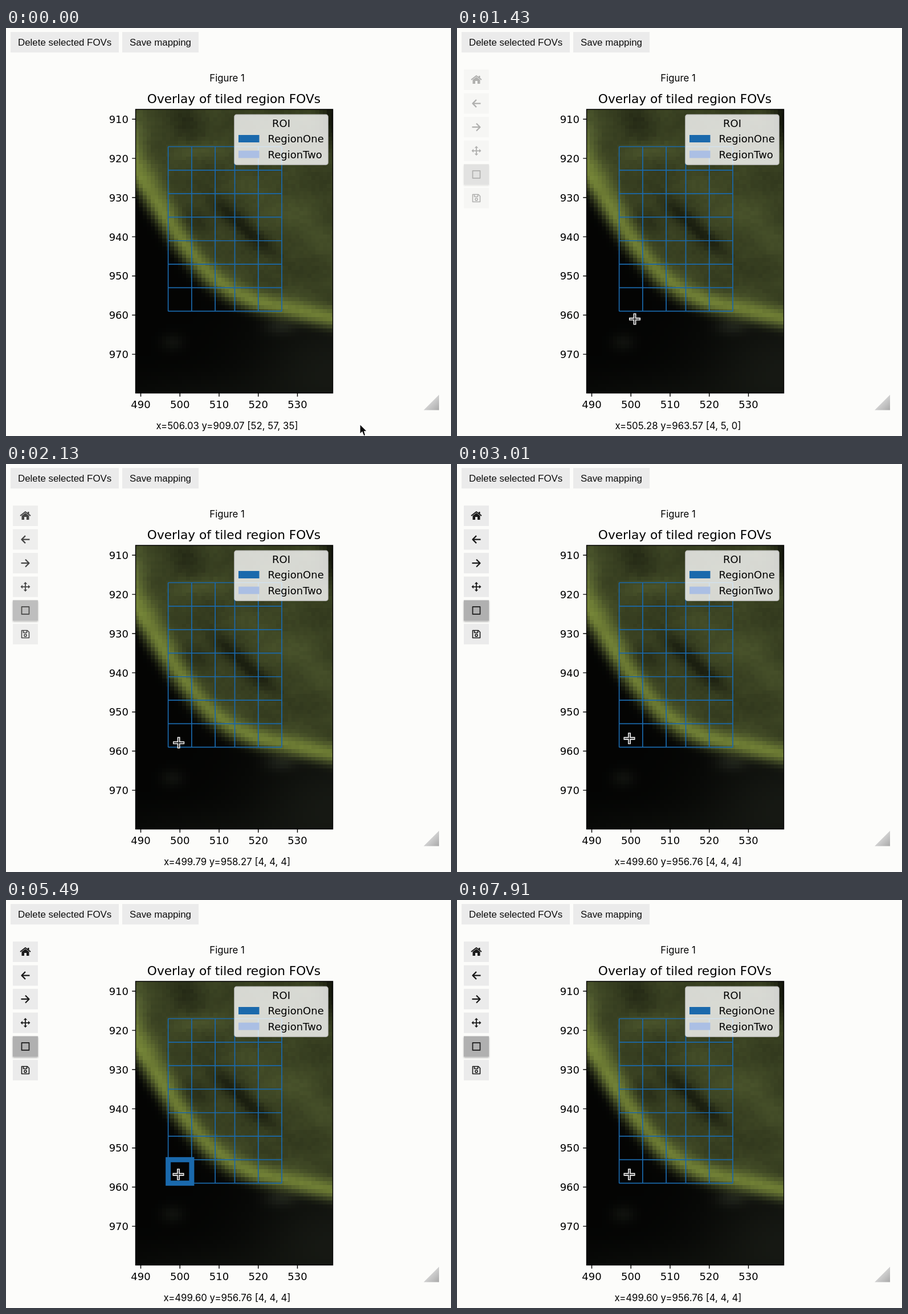
An HTML page with a canvas that plays this animation: 781x717 px, repeating every 8000 ms.

```html
<!DOCTYPE html>
<html lang="en">
<head>
<meta charset="utf-8">
<title>Tiled region overlay</title>
<style>
  html, body { margin: 0; width: 100%; height: 100%; overflow: hidden; background: #fcfcfa; }
  canvas, svg { position: absolute; left: 0; top: 0; display: block; }
  .plot { font: 18px "DejaVu Sans", sans-serif; }
  .title { font-size: 21.7px; }
  .button { font: 16.9px "Liberation Sans", Arial, sans-serif; }
  .ui { font: 16.8px Inter, sans-serif; }
  .mid { text-anchor: middle; }
  .end { text-anchor: end; }
</style>
</head>
<body>
<canvas id="photo" width="781" height="717"></canvas>
<svg id="stage" width="781" height="717" viewBox="0 0 781 717">
  <defs>
    <linearGradient id="grip" x1="0.35" y1="0.35" x2="1" y2="1">
      <stop offset="0" stop-color="#dcdcdc"/><stop offset="1" stop-color="#a9a9a9"/>
    </linearGradient>
    <filter id="shadow" x="-20%" y="-20%" width="140%" height="150%">
      <feDropShadow dx="0" dy="1.5" stdDeviation="1.8" flood-opacity="0.35"/>
    </filter>
  </defs>

  <g class="button" fill="#0c0c0c">
    <rect x="8" y="7" width="190" height="36" fill="#ebebeb"/>
    <text x="21" y="31">Delete selected FOVs</text>
    <rect x="204" y="7" width="134" height="36" fill="#ebebeb"/>
    <text x="217" y="31">Save mapping</text>
  </g>
  <text class="ui mid" x="388" y="94">Figure 1</text>

  <g id="toolbar"></g>

  <g id="axes" class="plot"></g>
  <rect id="picked" fill="none" stroke="#1a69ac" stroke-width="9"/>
  <g class="plot">
    <rect x="401" y="152.5" width="164" height="87.5" rx="3.6" fill="#fff" fill-opacity=".8" stroke="#ccc" stroke-opacity=".8" stroke-width="1.8"/>
    <text class="mid" x="483" y="174">ROI</text>
    <rect x="408" y="188" width="36.5" height="13" fill="#1a69ac"/>
    <rect x="408" y="215.5" width="36.5" height="13" fill="#abbfe4"/>
    <text x="459.5" y="201">RegionOne</text>
    <text x="459.5" y="228.5">RegionTwo</text>
  </g>

  <path d="M733 671.5L760 644.5V671.5Z" fill="url(#grip)"/>
  <text id="readout" class="ui mid" x="388" y="705"></text>

  <g id="tear" fill="none" stroke-width="1.3"></g>
  <path id="arrow" d="M0 0V18L4 14L7 21L10 20L8 13H13Z" fill="#080808" stroke="#fff" stroke-width="1.4"/>
  <g id="cross">
    <path d="M-10 0H10M0-10V10" stroke="#fff" stroke-width="4.8"/>
    <path d="M-8.7 0H8.7M0-8.7V8.7" stroke="#111" stroke-width="1.6"/>
  </g>
</svg>
<script>
const LOOP = 8000, CELL = 6.88, BLUE = "#1a69ac";
const BOX = { x: 227.5, y: 143, w: 346, h: 498.5 };
const PICK = [5200, 7100], TEAR = [6860, 6940];

const $ = id => document.getElementById(id);
const clamp = v => Math.min(1, Math.max(0, v));
const smooth = v => { v = clamp(v); return v * v * (3 - 2 * v); };
const within = (t, [a, b]) => t >= a && t < b;
const show = (id, on) => $(id).setAttribute("visibility", on ? "visible" : "hidden");

// Plot units to stage pixels and back
const toX = u => 236.5 + (u - 490) * 6.875;
const toY = v => 160.3 + (v - 910) * 6.885;
const fromX = x => 490 + (x - 236.5) / 6.875;
const fromY = y => 910 + (y - 160.3) / 6.885;

// Bright rim: a steep and a shallow line joined by a soft minimum
function rimY(x) {
  const steep = 259 + 1.6 * (x - 232), flat = 511 - .19 * (580 - x), k = 45;
  return -k * Math.log(Math.exp(-steep / k) + Math.exp(-flat / k));
}

function paintPhoto() {
  const g = $("photo").getContext("2d");
  let seed = 7;
  const rand = () => (seed = seed * 16807 % 2147483647) / 2147483647;
  g.beginPath();
  g.rect(BOX.x, BOX.y, BOX.w, BOX.h);
  g.clip();
  for (let row = 0; row < 73; row++) for (let col = 0; col < 52; col++) {
    const left = 226.2 + col * CELL, top = BOX.y + row * CELL;
    const x = left + CELL / 2, y = top + CELL / 2;
    const spot = (cx, cy, rx, ry, a = 0) => {
      const c = Math.cos(a), s = Math.sin(a), dx = x - cx, dy = y - cy;
      return Math.exp(-(((dx * c + dy * s) / rx) ** 2) - ((dy * c - dx * s) / ry) ** 2);
    };
    const slope = (rimY(x + 4) - rimY(x - 4)) / 8;
    const d = (y - rimY(x)) / Math.hypot(1, slope);
    const inside = 1 - smooth((d + 4) / 38);
    const spread = d > 0 ? 18 : 19 + 12 * smooth((330 - x) / 70);
    const rim = 62 * Math.exp(-((d / spread) ** 2));
    const grain = 5 * Math.sin(x / 21 + y / 40) * Math.sin(y / 17 - x / 50) + (rand() - .5) * 5;
    const tissue = (64 + grain
      + 22 * spot(230, 175, 20, 55) + 18 * spot(335, 215, 45, 15)
      + 16 * spot(495, 325, 95, 30, .65) - 34 * spot(420, 352, 84, 15, .72)
      - 14 * spot(338, 342, 38, 25, .75) - 20 * spot(315, 162, 34, 30)
      - 42 * spot(575, 160, 26, 48)) * inside + rim;
    const murk = (4 + 20 * spot(575, 600, 140, 110) + 8 * spot(350, 650, 170, 45)
      + 13 * spot(292, 552, 20, 15) + 20 * spot(482, 525, 28, 14)) * (1 - inside);
    const blue = .52 - .1 * clamp(rim / 60);
    const rgb = [tissue * .88 + murk * .9, tissue + murk, tissue * blue + murk * .78];
    g.fillStyle = `rgb(${rgb.map(v => Math.round(Math.max(0, v)))})`;
    const px = Math.round(left), py = Math.round(top);
    g.fillRect(px, py, Math.round(left + CELL) - px, Math.round(top + CELL) - py);
  }
}

function buildAxes() {
  let grid = "", ticks = "", labels = "";
  for (let i = 0; i < 6; i++) grid += `M${toX(497 + Math.round(5.8 * i))} ${toY(917)}V${toY(959)}`;
  for (let v = 917; v <= 959; v += 6) grid += `M${toX(497)} ${toY(v)}H${toX(526)}`;
  for (let v = 490; v <= 530; v += 10) {
    ticks += `M${toX(v)} 641.5v6.3`;
    labels += `<text class="mid" x="${toX(v)}" y="668">${v}</text>`;
  }
  for (let v = 910; v <= 970; v += 10) {
    ticks += `M227.5 ${toY(v)}h-6.3`;
    labels += `<text class="end" x="215" y="${toY(v) + 6.7}">${v}</text>`;
  }
  $("axes").innerHTML = `<path d="${grid}" fill="none" stroke="${BLUE}" stroke-width="1.7"/>
    <path d="${ticks}M227.5 143h346v498.5h-346Z" fill="none" stroke="#000" stroke-width="1.44"/>
    ${labels}<text class="title mid" x="400" y="132">Overlay of tiled region FOVs</text>`;
  const cell = { x: toX(497), y: toY(953), width: 6 * 6.875, height: 6 * 6.885 };
  for (const key in cell) $("picked").setAttribute(key, cell[key]);
}

function buildToolbar() {
  const line = (d, w = 2) => `<path d="${d}" fill="none" stroke="#1a1a1a" stroke-width="${w}" stroke-linejoin="round"/>`;
  const fill = d => `<path d="${d}" fill="#1a1a1a"/>`;
  const turn = (art, angle) => `<g transform="rotate(${angle})">${art}</g>`;
  const back = line("M7.5 0H-6M0-6.5L-6.5 0L0 6.5", 2.2);
  const spoke = line("M0 0V-6", 1.8) + fill("M0-8.5L3.2-5H-3.2Z");
  const icons = [
    line("M-9 0L0-7L9 0") + fill("M-6.5 0L0-5L6.5 0V7H2V2H-2V7H-6.5ZM4-7H6.5V-2L4-4Z"),
    back,
    turn(back, 180),
    [0, 90, 180, 270].map(a => turn(spoke, a)).join(""),
    line("M-6.5-6.5h13v13h-13Z", 1.7),
    line("M-6.5-6.5h10l3 3v10h-13ZM-3.5-6v3.5h6V-6", 1.6) + '<circle cy="2" r="2.1" fill="none" stroke="#1a1a1a" stroke-width="1.5"/>'
  ];
  $("toolbar").innerHTML = icons.map((icon, i) => {
    const look = i === 4 ? 'fill="#b0b0b0" filter="url(#shadow)"' : 'fill="#ebebeb"';
    return `<g transform="translate(34 ${91 + i * 41.6})"><rect x="-22" y="-18" width="44" height="36" ${look}/>${icon}</g>`;
  }).join("");
}

function buildTear() {
  let d = "";
  for (let y = 477; y < 527; y += 3.1) d += `M303 ${y}l23 .6`;
  $("tear").innerHTML = `<path d="${d}" stroke="#5b9dd0"/>
    <path d="M303.5 476v50M309 478v48" stroke="#f2f8ff" stroke-dasharray="1.6 2.2"/>`;
}

// Pointer stops, joined by straight moves
const STOPS = [
  { t: 280, x: 621, y: 696 }, { t: 1430, x: 312, y: 511.47 },
  { t: 2040, x: 303.23, y: 491.32 }, { t: 2600, x: 302.5, y: 482.25 }];

function pointer(t) {
  const i = Math.max(1, STOPS.findIndex(s => s.t >= t));
  const [a, b] = t >= 2600 ? STOPS.slice(-2) : [STOPS[i - 1], STOPS[i]];
  const k = clamp((t - a.t) / (b.t - a.t));
  return { x: a.x + (b.x - a.x) * k, y: a.y + (b.y - a.y) * k };
}
const inAxes = p => p.x < BOX.x + BOX.w && p.y < BOX.y + BOX.h;

// The readout trails the pointer and refreshes every 40 ms
function readout(t) {
  const p = pointer(Math.floor((t - 100) / 40) * 40);
  if (!inAxes(p)) return "x=506.03 y=909.07 [52, 57, 35]";
  const tone = p.y > toY(959) ? "[4, 5, 0]" : "[4, 4, 4]";
  return `x=${fromX(p.x).toFixed(2)} y=${fromY(p.y).toFixed(2)} ${tone}`;
}

function draw(t) {
  const p = pointer(t), hit = inAxes(p), torn = within(t, TEAR);
  for (const id of ["arrow", "cross"]) $(id).setAttribute("transform", `translate(${p.x} ${p.y})`);
  show("arrow", !hit);
  show("cross", hit && !torn);
  show("tear", torn);
  show("picked", within(t, PICK));
  $("toolbar").setAttribute("opacity", clamp((t - 940) / 1480));
  $("readout").textContent = readout(t);
}

paintPhoto();
buildAxes();
buildToolbar();
buildTear();
const start = performance.now();
function tick() {
  draw((performance.now() - start) % LOOP);
  requestAnimationFrame(tick);
}
tick();
</script>
</body>
</html>
```
